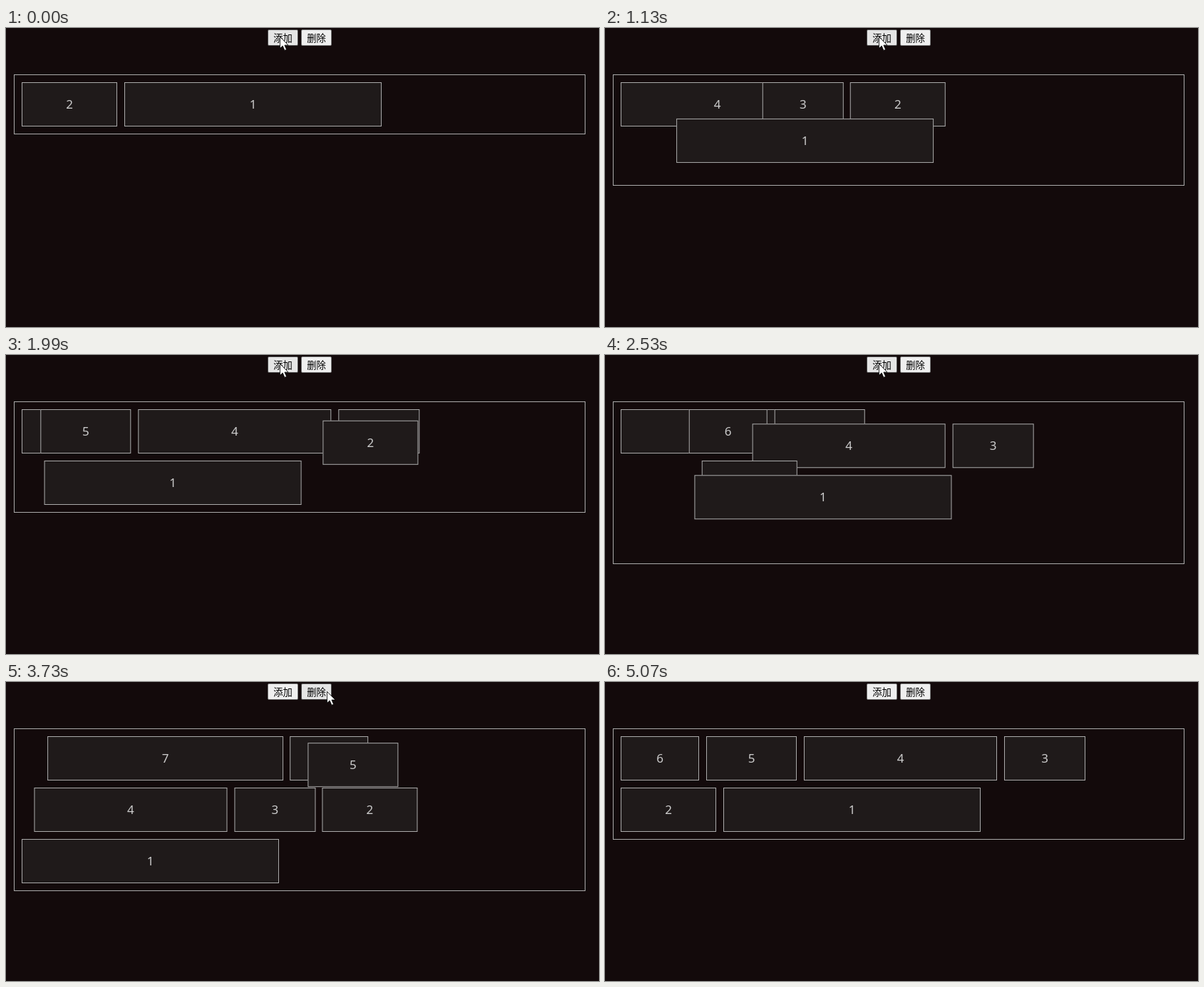
Write an HTML page that moves like this. It is 832x419 px and loops after 5.53 s.

```html
<!DOCTYPE html>
<html lang="zh">
<head>
<meta charset="utf-8">
<title>FLIP list</title>
<style>
  html, body { margin: 0; width: 100%; height: 100%; overflow: hidden; background: #130a0b; }
  body { position: relative; }
  body > *, .box { position: absolute; box-sizing: border-box; }
  button {
    top: 2px; width: 43px; height: 23px; padding: 0; margin: 0;
    border: 1px solid #767676; border-radius: 2px; background: #efefef; color: #000;
    font: 13.333px/21px "Noto Sans CJK SC", "Noto Sans CJK", sans-serif;
    pointer-events: none;
  }
  button.hover { background: #e5e5e5; border-color: #4f4f4f; }
  button.press { background: #f5f5f5; border-color: #8d8d8d; }
  #add { left: 367px; }
  #remove { left: 414px; }
  #frame { left: 11px; top: 65px; width: 802px; border: 1px solid #aaa; }
  #list { left: 0; top: 0; }
  .box {
    left: 0; top: 0; height: 62px; border: 1px solid #aaa; background: #1f1a1a; color: #ccc;
    font: 17px/60px "Noto Sans", "Open Sans", sans-serif; text-align: center;
  }
  #cursor { left: 0; top: 0; overflow: visible; }
</style>
</head>
<body>
<button id="add">添加</button>
<button id="remove">删除</button>
<div id="frame"></div>
<div id="list"></div>
<svg id="cursor" width="13" height="21">
  <path d="M.5 .5V16.6L4.2 13.1L6.9 19.4L9.6 18.2L6.9 12.1H12Z" fill="#fff" stroke="#000" stroke-width=".8"/>
</svg>
<script>
const LOOP = 5530, DURATION = 500, PRESS = 70;
const GAP = 10, LEFT = 21.6, RIGHT = 802, TOP = 76, ROW = 72;
const widths = [0, 361, 133.95, 113.5, 271, 126.95, 110, 330.6, 273.8];

// Number of boxes in the list after each click
const clicks = [
  [0, 2], [440, 3], [922, 4], [1341, 5], [1908, 6],
  [2434, 7], [2827, 8], [3440, 7], [3992, 6],
].map(([time, count]) => ({ time, count }));

// Cursor tip: time, x, y
const path = [
  [0, 384, 12], [2880, 384, 12], [3080, 441, 11], [3200, 441, 11],
  [3400, 450, 13], [4670, 450, 13], [5060, 765, 425], [LOOP, 765, 425],
];

const $ = id => document.getElementById(id);
const lerp = (a, b, p) => a + (b - a) * p;
const bezier = (a, b, s) => 3 * (1 - s) ** 2 * s * a + 3 * (1 - s) * s * s * b + s ** 3;

// cubic-bezier(.25, .1, .25, 1)
function ease(t) {
  if (t >= 1) return 1;
  let low = 0, high = 1;
  for (let i = 0; i < 20; i++) {
    const mid = (low + high) / 2;
    if (bezier(.25, .25, mid) < t) low = mid; else high = mid;
  }
  return bezier(.1, 1, low);
}

// Newest box first, wrapping from row to row
function layout(count) {
  const spots = [];
  let x = LEFT, y = TOP;
  for (let id = count; id > 0; id--) {
    if (x + widths[id] > RIGHT) { x = LEFT; y += ROW; }
    spots[id] = { x: Math.round(x), y };
    x += widths[id] + GAP;
  }
  return spots;
}

// Every box glides from where it was at the click to its new spot
function pose(step, time) {
  const { time: start, count } = clicks[step];
  const target = layout(count);
  if (step === 0) return target;
  const before = pose(step - 1, start);
  const p = ease((time - start) / DURATION);
  return target.map((to, id) => {
    const from = before[id] || to;
    return { x: lerp(from.x, to.x, p), y: lerp(from.y, to.y, p) };
  });
}

function cursorAt(time) {
  const i = path.findIndex(key => key[0] > time);
  const [t0, x0, y0] = path[i - 1], [t1, x1, y1] = path[i];
  const p = (time - t0) / (t1 - t0);
  return { x: lerp(x0, x1, p), y: lerp(y0, y1, p) };
}

const boxes = [];
for (let id = 8; id > 0; id--) {
  const box = boxes[id] = document.createElement("div");
  box.className = "box";
  box.textContent = id;
  box.style.width = Math.round(widths[id]) + "px";
  $("list").append(box);
}

function place(element, { x, y }) {
  element.style.transform = `translate(${x}px, ${y}px)`;
}

function draw(time) {
  const step = clicks.findLastIndex(click => click.time <= time);
  const spots = pose(step, time);
  boxes.forEach((box, id) => {
    box.style.display = spots[id] ? "block" : "none";
    if (spots[id]) place(box, spots[id]);
  });
  const rows = (layout(clicks[step].count)[1].y - TOP) / ROW;
  $("frame").style.height = 84 + rows * ROW + "px";

  const tip = cursorAt(time);
  place($("cursor"), tip);
  const pressed = clicks.some(click => time < click.time && time >= click.time - PRESS);
  for (const [id, left] of [["add", 367], ["remove", 414]]) {
    const hover = tip.y < 25 && tip.x >= left && tip.x < left + 43;
    $(id).className = hover ? (pressed ? "press" : "hover") : "";
  }
}

const begin = performance.now();
function tick() {
  draw((performance.now() - begin) % LOOP);
  requestAnimationFrame(tick);
}
tick();
</script>
</body>
</html>
```
